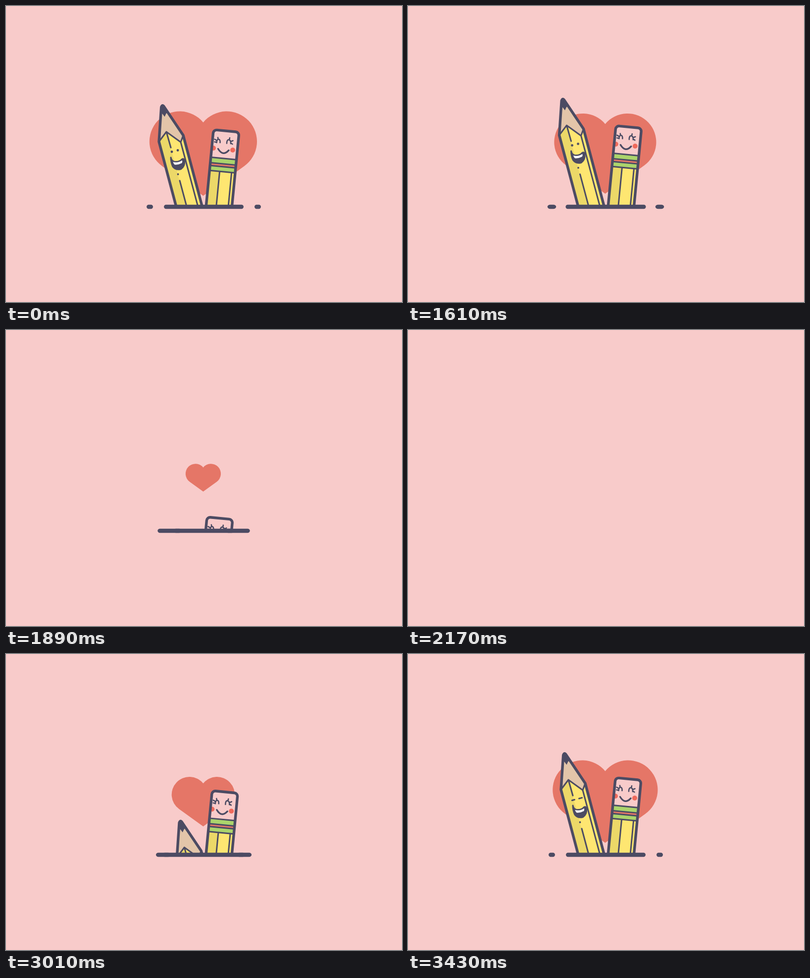
An HTML page without scripts that plays this animation: 800x600 px, repeating every 3.5 s.

```html
<!DOCTYPE html>
<html lang="en">
<head>
<meta charset="utf-8">
<title>Pencil pals</title>
<style>
@property --f { syntax: "<number>"; inherits: true; initial-value: 0; }

html, body { margin: 0; width: 100%; height: 100%; overflow: hidden; background: #f8cbca; }

svg {
  display: block; width: 100vw; height: 100vh;
  --ink: #4c4b63;
  animation: tick 3.5s steps(50) -4ms infinite;
  /* i: how far the scene has left; it runs forward, rests, then runs back */
  --i: max(0, min(var(--f) - 20, 48.85 - var(--f)));
  --back: clamp(0, var(--f) - 38, 1);
}
@keyframes tick { from { --f: 0; } to { --f: 50; } }

.ink { fill: none; stroke: var(--ink); stroke-width: 3; stroke-linecap: round; stroke-linejoin: round; }
.edge { stroke-width: 5.4; }
.dark { fill: var(--ink); }
.light { fill: #fee671; }
.shade { fill: #ecd868; }
.pink { fill: #f8cbca; }
.green { fill: #abd46c; }
.red { fill: #e57667; }
.cheek { fill: #ef6a5c; }

.heart {
  --out: pow(clamp(0, (var(--i) - 1.2) / 6.95, 1), 2.2);
  --tail: var(--back) * exp(-.44 * (var(--f) - 40.43));
  transform-origin: 398.4px 299.5px;
  transform: scale(calc(1 - min(1, max(var(--out), var(--tail)))));
}

/* both pencils slide along their own axis with a back-in ease */
.slide {
  --t: clamp(0, (var(--i) - var(--start)) / 5.37, 1);
  --y: var(--len) * pow(var(--t), 2) * ((var(--s) + 1) * var(--t) - var(--s));
  transform: translate(calc(var(--y) * var(--lean) * 1px), calc(var(--y) * 1px));
}
.tall { --start: .98; --s: 1.3; --len: 212; --lean: .265; }
.short { --start: 1.87; --s: 1.70158; --len: 160; --lean: -.102; }

.ground {
  --grow: 1 + .2 * clamp(0, (var(--i) - 2.95) / 1.38, 1);
  --shut: 1.2 - pow(max(0, (var(--i) - 6.75) / 2.88), 1.3);
  transform-origin: 399.5px 407px;
  transform: scaleX(calc(max(0, min(var(--grow), var(--shut)))));
}
.dash {
  --swing: -8 * sin(60deg * min(var(--i), 3));
  --pull: 7 * pow(max(0, var(--i) - 3), 1.5);
  transform-origin: 290.5px 407px;
  transform: translateX(calc((var(--swing) + var(--pull)) * 1px)) scaleX(calc(1 + .35 * min(1, var(--i) / 2)));
  opacity: calc(9 - var(--i));
}

.open { animation: open 3.5s step-end -4ms infinite; }
.shut { animation: shut 3.5s step-end -4ms infinite; }
@keyframes open { 0%, 30% { opacity: 1; } 28%, 98%, 100% { opacity: 0; } }
@keyframes shut { 0%, 30% { opacity: 0; } 28%, 98%, 100% { opacity: 1; } }
</style>
</head>
<body>
<svg viewBox="0 0 800 600" xmlns="http://www.w3.org/2000/svg">
  <defs>
    <clipPath id="above"><rect width="800" height="405"/></clipPath>
  </defs>

  <path class="heart red" d="M398.4 236A61.2 61.2 0 1 0 315.4 324.5L398.4 384.8L481.4 324.5A61.2 61.2 0 1 0 398.4 236Z"/>

  <g clip-path="url(#above)">
    <g class="slide tall">
      <path class="light" d="M309 275L324 255L353 276L358 262L406 443H353.5Z"/>
      <path class="shade" d="M309 275L324 255L374.5 443H353.5Z"/>
      <path fill="#e3c5a9" d="M309 275L313.5 205L319.5 204L358 262L353 276L324 255Z"/>
      <path class="dark" d="M312.5 218L314 203L319 203L326 216L323.5 218L320.5 224.5L316 218.5Z"/>
      <path class="ink" d="M309 275L324 255L353 276L358 262M324 255L333 287M351 354L374.8 443M353 276L397.5 443"/>
      <path class="ink edge" d="M353.5 443L309 275L313.7 205Q316 199 319.2 204L358 262L406 443"/>

      <g class="open dark"><circle cx="335" cy="295.5" r="2.4"/><circle cx="347" cy="292.5" r="2.4"/></g>
      <path class="shut ink" d="M331.3 296.7L336.5 295.2M345.5 293L351.5 291.4"/>
      <path class="ink dark" style="fill:var(--ink)" d="M333 307Q334.5 314 340 315.5Q350 317 355.5 310.5Q360 308 360.5 314Q361.5 325 353.5 330.5Q343 333.5 337 325.5Q333 317 333 307Z"/>
      <path fill="#fff" d="M337.5 316Q347 319 355.5 313Q357 315.5 355 318.5Q347.5 322.5 340.5 321.5Q338 319 337.5 316Z"/>
      <circle class="dark" cx="347.5" cy="341" r="1.9"/>
    </g>

    <g class="slide short">
      <g transform="translate(404.5 403) rotate(5.5)">
        <rect class="pink" y="-153" width="52" height="60" rx="7"/>
        <rect class="green" y="-97" width="52" height="27"/>
        <rect class="red" y="-86" width="52" height="6"/>
        <rect class="light" y="-70" width="52" height="110"/>
        <rect class="shade" y="-70" width="20.5" height="110"/>
        <path class="ink" d="M0-97H52M0-70H52M20.5-70V40M44.7-70V40"/>
        <path class="ink" stroke-width="2.5" d="M0-86H52M0-80.2H52"/>
      </g>
      <circle class="cheek" cx="419" cy="288" r="5"/>
      <circle class="cheek" cx="458" cy="292" r="5"/>
      <path class="ink" style="stroke-width:2.6" d="M425.5 277Q426 270 429.3 270Q433 270.5 432.5 277M428.5 270L428 266.5M425.5 272.5L421.5 270M425.3 276L421.5 275.5M446 278.5Q446 270.8 450.3 271Q454.5 272 454 279M451 271L452 267.3M454.5 274.5L458.5 273M454.3 278L457.5 280"/>
      <path class="ink" style="stroke-width:3.4" d="M428.5 289.5Q438 305.5 450 292.5"/>
      <rect class="ink edge" transform="translate(404.5 403) rotate(5.5)" y="-153" width="52" height="200" rx="7"/>
    </g>
  </g>

  <rect class="ground dark" x="319" y="402.8" width="161" height="8.4" rx="4.2"/>
  <rect id="dash" class="dash dark" x="284" y="402.8" width="13" height="8.4" rx="4.2"/>
  <use href="#dash" transform="translate(799 0) scale(-1 1)"/>
</svg>
</body>
</html>
```
